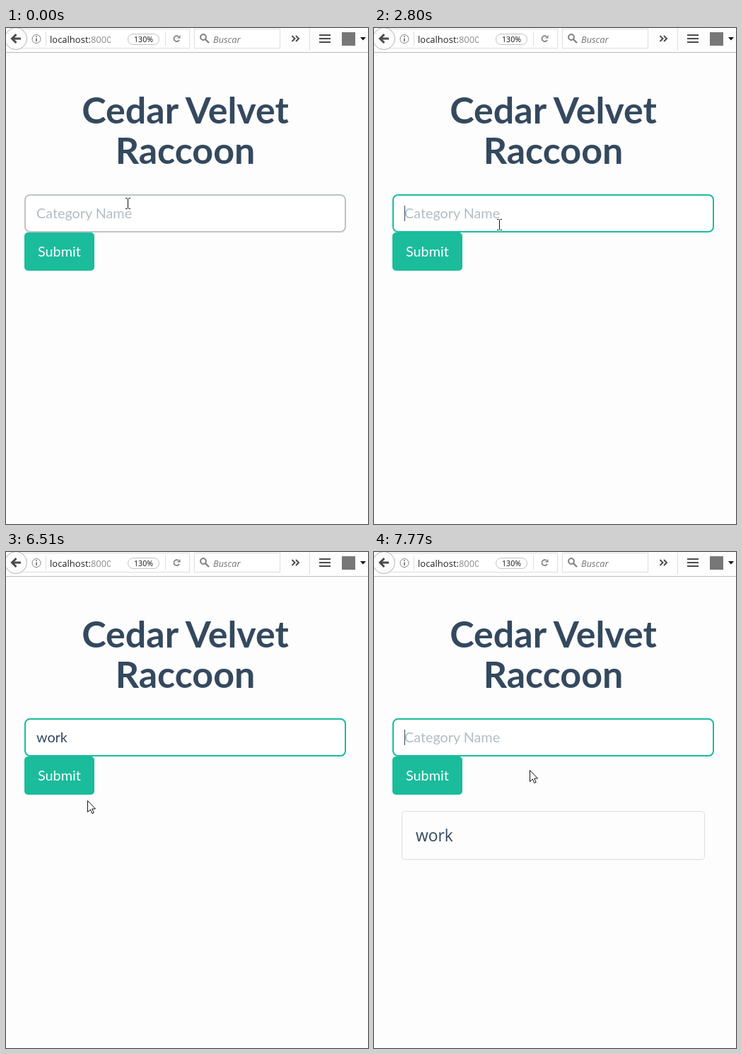
An HTML page for the animation above (8 s loop, 512x701 px).

```html
<!DOCTYPE html>
<html lang="en">
<head>
<meta charset="utf-8">
<title>Category form</title>
<style>
html, body { margin: 0; width: 100%; height: 100%; overflow: hidden; background: #fdfdfd; }
svg { display: block; width: 100%; height: 100%; }
text { white-space: pre; }
.ui { font-family: "Open Sans", "Noto Sans", sans-serif; }
.lato { font-family: Lato, sans-serif; font-size: 19.8px; }
.title { font: 700 52px Lato, sans-serif; fill: #34495e; text-anchor: middle; }
.line { fill: none; stroke: #4c4c4c; }
.soft { fill: none; stroke: #808080; }
</style>
</head>
<body>
<svg viewBox="0 0 512 701">
  <defs>
    <clipPath id="urlClip"><rect x="58" y="2" width="90" height="26"/></clipPath>
  </defs>
  <rect width="512" height="701" fill="#fdfdfd"/>

  <g id="toolbar" class="ui">
    <path d="M0 34.5H512" stroke="#bcbcbc"/>
    <rect x="20.5" y="1.5" width="239" height="27" fill="#fff" stroke="#dedede"/>
    <rect x="266.5" y="1.5" width="121" height="27" fill="#fff" stroke="#dedede"/>
    <circle cx="14" cy="15" r="15.5" fill="#fdfdfd" stroke="#b4b4b4"/>
    <path d="M21 15H9M14.5 9L8.5 15L14.5 21" class="line" stroke-width="3"/>
    <circle cx="43" cy="15.5" r="6" class="soft"/>
    <path d="M43 14.5V19M43 11.5V13" class="line" stroke-width="1.4"/>
    <path d="M56.5 5V25M225.5 5V25M429.5 1V32" stroke="#dcdcdc"/>
    <text x="62" y="21" font-size="13" fill="#222" clip-path="url(#urlClip)">localhost:<tspan fill="#8c8c8c">8000</tspan></text>
    <rect x="172.5" y="8.5" width="44" height="15" rx="7.5" fill="#fff" stroke="#c4c4c4"/>
    <text x="181" y="20" font-size="10.7" fill="#111">130%</text>
    <path d="M243.8 11.8A4 4 0 1 0 245 17" class="soft" stroke-width="1.7"/>
    <path d="M246.5 10V14.5H242Z" fill="#808080"/>
    <circle cx="279" cy="13" r="3.9" class="soft" stroke-width="2"/>
    <path d="M282 16L287 21" class="soft" stroke-width="2.4"/>
    <text x="293" y="21" font-size="12.8" font-style="italic" fill="#747474">Buscar</text>
    <path d="M404.5 11L408.5 15L404.5 19M410 11L414 15L410 19" class="line" stroke-width="2"/>
    <path d="M443 10H459M443 15H459M443 20H459" class="line" stroke-width="2"/>
    <rect x="475" y="6" width="19" height="19" fill="#777"/>
    <path d="M501 13H509L505 17.5Z" fill="#111"/>
  </g>

  <text class="title" x="253.5" y="135">Cedar Velvet</text>
  <text class="title" x="253.5" y="192">Raccoon</text>

  <rect id="field" x="27" y="236" width="453" height="52" rx="7" fill="#fff" stroke-width="2"/>
  <text id="value" class="lato" x="43" y="269"></text>
  <rect id="caret" y="251" width="1" height="22" fill="#34495e"/>

  <rect id="button" x="26" y="289" width="99" height="54" rx="5"/>
  <text class="lato" x="45" y="323" fill="#fff">Submit</text>

  <g id="card">
    <rect x="39.5" y="366.5" width="428" height="68" rx="4" fill="#fdfdfd" stroke="#dcdcdc"/>
    <text class="ui" x="59" y="409" font-size="22.8" fill="#34495e">work</text>
  </g>

  <g id="list">
    <path d="M33 411.5H482.5V296" fill="none" stroke="#000" stroke-opacity=".22" stroke-width="3"/>
    <path d="M32 410.5H481.5V295" fill="none" stroke="#000" stroke-opacity=".25"/>
    <rect x="25.5" y="288.5" width="454" height="121" fill="#fff" stroke="#a3a3a3"/>
    <rect x="463" y="289" width="16" height="120" fill="#f0f0f0"/>
    <rect x="463" y="306" width="15" height="22" fill="#cdcdcd"/>
    <path d="M467 300L470.5 296.5L474 300M467 399L470.5 402.5L474 399" class="line" stroke-width="1.8"/>
    <g id="options" class="ui" font-size="11" fill="#000"></g>
  </g>

  <g id="pointer">
    <path id="arrow" d="M.5 .5V16.5L4.3 13L6.8 18.5L9.2 17.5L6.8 12H11.5Z" fill="#fff" stroke="#111"/>
    <path id="beam" d="M-3 -7.5H-.5M1.5 -7.5H4M.5 -7V7M-3 7.5H-.5M1.5 7.5H4" fill="none" stroke="#111"/>
    <path id="hand" d="M-1.5 11V1.5Q0 -.5 1.5 1.5V7L9 8.5Q10.5 9 10.5 11L9 18.5H1L-4.5 12Q-5 9.5 -3 9.5Z" fill="#fff" stroke="#111"/>
  </g>
</svg>
<script>
const LOOP = 8000;
const GREY = [189, 195, 199], TEAL = [26, 188, 156], MINT = [72, 201, 176];
const $ = id => document.getElementById(id);
const show = (id, on) => $(id).style.display = on ? "" : "none";
const mix = (a, b, k) => `rgb(${a.map((v, i) => Math.round(v + (b[i] - v) * k))})`;

$("options").innerHTML = ["cat1", "seis", "uno", "d", "dsf", "otra"]
  .map((word, i) => `<text x="31" y="${304 + 20 * i}">${word}</text>`).join("");

const at = (shape, x, y) => ({ shape, x, y });

// Each step changes part of the state at its time.
const steps = [
  [0, { ...at("beam", 172, 248), text: "", caret: false, list: false, card: false, focus: 0, glow: 0 }],
  [1340, { caret: true }],
  [1460, { list: true, focus: .1 }],
  [1610, { focus: .45, ...at("beam", 172, 252) }],
  [1730, { focus: .85, ...at("beam", 174, 263) }],
  [1850, { focus: 1, ...at("beam", 175, 271) }],
  [2000, { caret: false }],
  [2400, { caret: true, list: false }],
  [2800, at("beam", 177, 278)],
  [2950, { caret: false, ...at("arrow", 236, 408) }],
  [3070, at("arrow", 318, 547)],
  [3220, at("arrow", 319, 553)],
  [3490, { caret: true }],
  [4050, { caret: false }],
  [4640, { caret: true }],
  [5040, { caret: false }],
  [5190, { caret: true, text: "w" }],
  [5310, { text: "wo" }],
  [5460, { text: "wor" }],
  [5740, { text: "work" }],
  [6270, { caret: false, ...at("arrow", 290, 520) }],
  [6390, at("arrow", 178, 415)],
  [6510, at("arrow", 115, 351)],
  [6660, { ...at("hand", 97, 319), focus: .9, glow: .3 }],
  [6780, { focus: .4, glow: .6 }],
  [6930, { ...at("arrow", 169, 401), text: "", card: true, focus: .06, glow: .8 }],
  [7080, at("beam", 66, 401)],
  [7200, at("arrow", 189, 384)],
  [7320, at("beam", 187, 284)],
  [7470, at("beam", 181, 268)],
  [7620, { caret: true, focus: .5, glow: .4 }],
  [7770, { ...at("arrow", 220, 308), focus: 1, glow: 0 }]
];

function draw(time) {
  const t = time % LOOP;
  const s = Object.assign({}, ...steps.filter(step => step[0] <= t).map(step => step[1]));
  const value = $("value");
  value.textContent = s.text || "Category Name";
  value.setAttribute("fill", s.text ? "#34495e" : "#b2bcc5");
  const typed = s.text ? value.getComputedTextLength() : 0;
  $("caret").setAttribute("x", Math.floor(43 + typed));
  $("field").setAttribute("stroke", mix(GREY, TEAL, s.focus));
  $("button").setAttribute("fill", mix(TEAL, MINT, s.glow));
  for (const id of ["caret", "list", "card"]) show(id, s[id]);
  for (const id of ["arrow", "beam", "hand"]) show(id, s.shape === id);
  $("pointer").setAttribute("transform", `translate(${s.x} ${s.y})`);
}

const start = performance.now();
function tick() {
  draw(performance.now() - start);
  requestAnimationFrame(tick);
}
draw(0);
requestAnimationFrame(tick);
</script>
</body>
</html>
```
